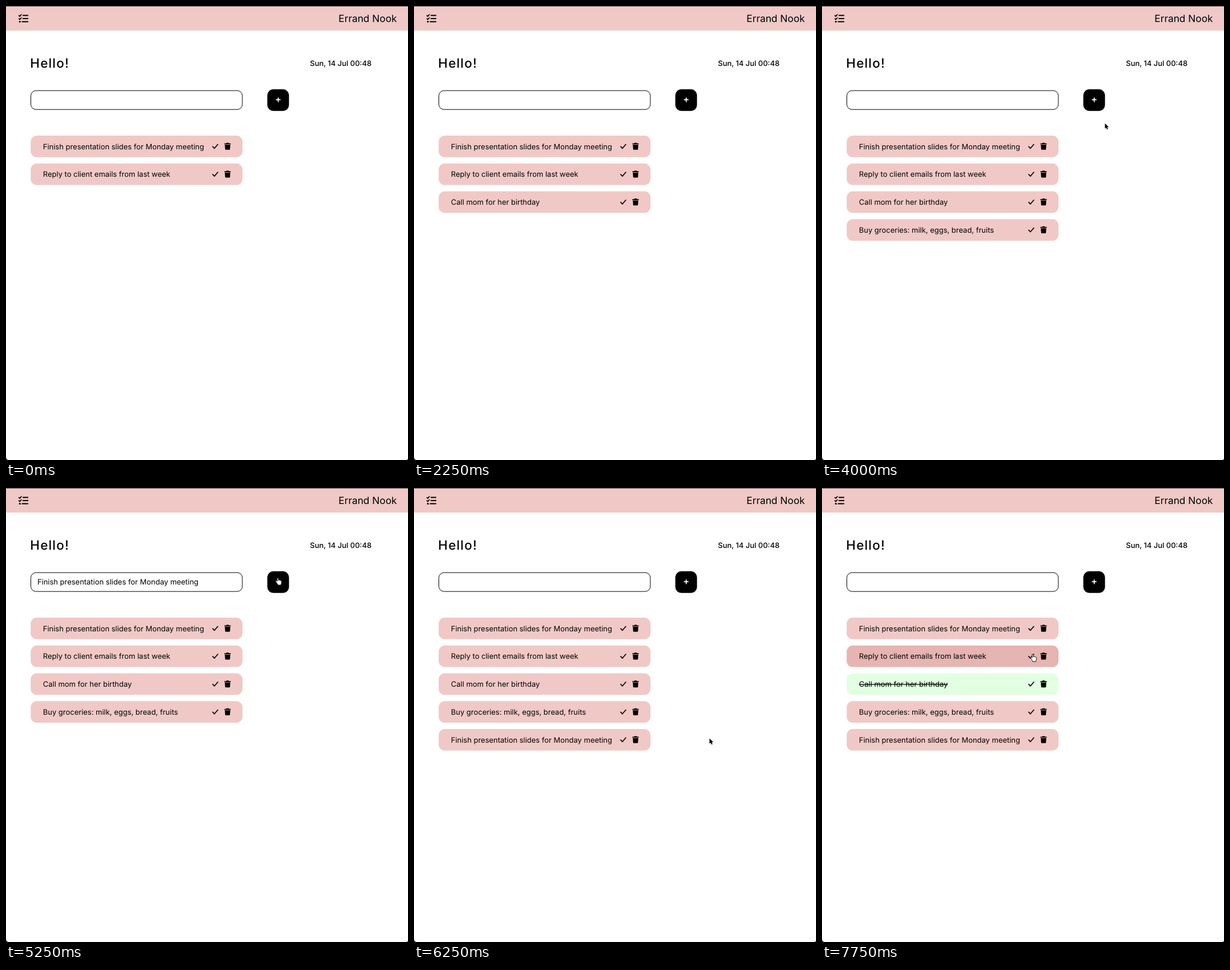
Write an HTML page that moves like this. It is 704 by 795 pixels and loops after 8000 ms.

```html
<!DOCTYPE html>
<html lang="en">
<head>
<meta charset="utf-8">
<title>To-do list</title>
<style>
  html, body { margin: 0; width: 100%; height: 100%; overflow: hidden; background: #fff; }
  svg { display: block; width: 704px; height: 795px; }
  text {
    font: 400 12.96px Inter, sans-serif;
    font-optical-sizing: none;
    text-rendering: geometricPrecision;
    white-space: pre;
  }
  .title { font-size: 17.28px; text-anchor: end; }
  .hello { font-size: 22.4px; font-weight: 500; letter-spacing: 1.2px; }
  .date { font-weight: 500; }
  .done { text-decoration: line-through; }
  .line { fill: none; stroke: #000; stroke-linecap: round; stroke-linejoin: round; }
</style>
</head>
<body>
<svg viewBox="0 0 704 795" xmlns="http://www.w3.org/2000/svg">
  <defs>
    <g id="icons">
      <path class="line" stroke-width="1.7" d="M362 19.2l3 3.1 6-7"/>
      <path d="M382.4 14.2q0-.7.7-.7h2.5l.7-1h3.4l.7 1h2.5q.7 0 .7.7v1h-11.2z
               M383.2 16h9.6l-.6 7.7q-.1 1.1-1.2 1.1h-6q-1.1 0-1.2-1.1z"/>
    </g>
    <path id="arrow" d="M0 0v9.3l2.1-1.9 1.5 3.4 1.7-.8-1.5-3.3h2.9z"
          stroke="#fff" stroke-width=".8" paint-order="stroke"/>
    <path id="hand" d="M-1.1 1.2q0-1.2 1-1.2t1.1 1.2v3.5q.2-.9 1.1-.8t1 1q.3-.7 1.1-.5t.9 1q1.4-.4 1.5 1v2.4
               q0 1.4-1 2.6v1.6h-5.8v-1.5q-1.6-1.4-2.3-3.1l-1.3-2q-.5-1 .4-1.3t1.6.6l.7.8z"
          fill="#fff" stroke="#000" stroke-width=".9" stroke-linejoin="round"/>
  </defs>

  <rect width="704" height="43" fill="#f0c9c6"/>
  <rect width="704" height="1" fill="#5c5152"/>
  <path class="line" stroke-width="1.7" d="M22.6 16.6l1.5 1.5 2.7-3.1M22.6 22.2l1.5 1.5 2.7-3.1"/>
  <path class="line" stroke-width="2.1" d="M29.9 16.5h8.3M29.9 22h8.3M28.4 27.5h9.8"/>
  <circle cx="24.3" cy="27.5" r="1.6"/>
  <text class="title" x="684.5" y="28.3">Errand Nook</text>
  <text class="hello" x="42.3" y="108">Hello!</text>
  <text class="date" x="532.3" y="104.9">Sun, 14 Jul 00:48</text>

  <rect x="43.5" y="148.2" width="370.4" height="33" rx="9" fill="#fff" stroke="#000"/>
  <text id="draft" x="54.9" y="169.2"></text>
  <rect x="457.6" y="145.8" width="38" height="38" rx="10.5"/>
  <path d="M472.7 164.2h8M476.7 160.2v8" stroke="#fff" stroke-width="1.8"/>

  <g id="list"></g>
  <use id="pointer"/>
  <path d="M0 789q0 6 5 6h-5zM704 792q0 3-3 3h3z"/>
</svg>
<script>
const LOOP = 8000, STEP = 250;
const PINK = '#f0c9c6', PINK_HOVER = '#e6b4b1', GREEN = '#e2ffe2', GREEN_HOVER = '#c8ffca';

// Each task appears at `added`, after its text was typed from `typed` to `full`.
const tasks = [
  { text: 'Finish presentation slides for Monday meeting', added: 0 },
  { text: 'Reply to client emails from last week', added: 0 },
  { text: 'Call mom for her birthday', typed: 1500, full: 2000, added: 2250, done: 6750 },
  { text: 'Buy groceries: milk, eggs, bread, fruits', typed: 3250, full: 3750, added: 4000 },
  { text: 'Finish presentation slides for Monday meeting', typed: 4250, full: 5250, added: 5500 }
];

// Pointer stops: time, kind, x, y, hovered row.
const stops = [
  [0],
  [3750, 'hand', 476, 160],
  [4000, 'arrow', 495.5, 205.5],
  [4250],
  [5250, 'hand', 476, 157],
  [5500, 'arrow', 479, 205.5],
  [5750, 'arrow', 475, 280],
  [6000, 'arrow', 499, 368],
  [6250, 'arrow', 517.5, 438.5],
  [6500, 'hand', 368, 341, 2],
  [6750, 'hand', 280, 341, 2],
  [7500, 'hand', 352, 341, 2],
  [7750, 'hand', 369, 291, 1]
];

const byId = id => document.getElementById(id);
const draft = byId('draft'), list = byId('list'), pointer = byId('pointer');

function row(task, index, time, hovered) {
  const done = time >= task.done;
  const hover = index === hovered;
  const fill = done ? (hover ? GREEN_HOVER : GREEN) : (hover ? PINK_HOVER : PINK);
  return `<g transform="translate(0 ${227 + index * 48.75})">
    <rect x="43.2" width="371" height="37.8" rx="10.8" fill="${fill}"/>
    <text x="64.8" y="23.5" class="${done ? 'done' : ''}">${task.text}</text>
    <use href="#icons"/></g>`;
}

function typedText(time) {
  const task = tasks.find(t => time > t.typed && time < t.added);
  if (!task) return '';
  const part = Math.min(1, (time - task.typed) / (task.full - task.typed));
  return task.text.slice(0, Math.round(part * task.text.length));
}

function draw(time) {
  const [, kind, x, y, hovered] = stops.findLast(stop => stop[0] <= time);
  list.innerHTML = tasks
    .map((task, i) => time >= task.added ? row(task, i, time, hovered) : '')
    .join('');
  draft.textContent = typedText(time);
  pointer.setAttribute('href', kind ? '#' + kind : '');
  pointer.setAttribute('transform', kind ? `translate(${x} ${y})` : '');
}

let shown = -1;
function tick() {
  const time = Math.floor(performance.now() % LOOP / STEP) * STEP;
  if (time !== shown) draw(shown = time);
  requestAnimationFrame(tick);
}
tick();
</script>
</body>
</html>
```
